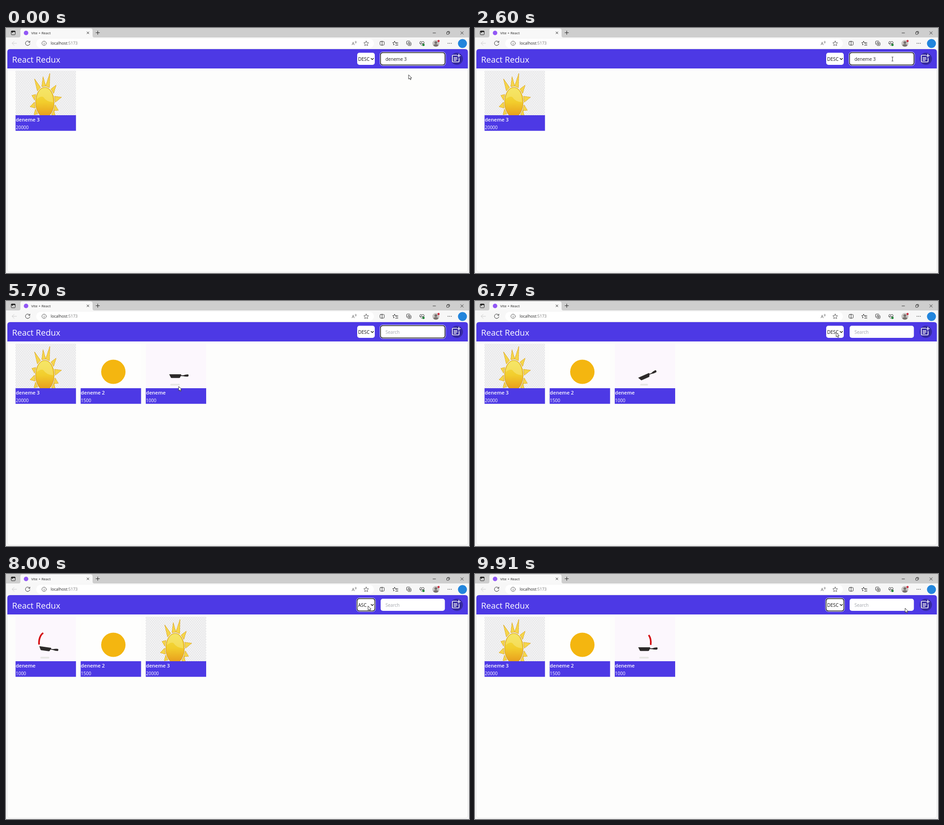
Animation, 1027 px wide and 545 px high, one loop 9.95 s. Source, as an HTML page:

```html
<!DOCTYPE html>
<html lang="en">
<head>
<meta charset="utf-8">
<title>Vite + React</title>
<style>
  html, body { margin: 0; width: 100%; height: 100%; overflow: hidden; background: #f7f7f7; }
  svg { display: block; width: 1027px; height: 545px; font-family: "Open Sans", "Noto Sans", sans-serif; }
  text { white-space: pre; }
  .line { fill: none; stroke: #333; stroke-width: 1; stroke-linecap: round; stroke-linejoin: round; }
  .name { font-size: 11.1px; font-weight: 600; fill: #fff; }
  .price { font-size: 10px; fill: #fff; }
  .ring rect { fill: none; }
</style>
</head>
<body>
<svg viewBox="0 0 1027 545">
  <defs>
    <pattern id="check" width="4" height="6" patternUnits="userSpaceOnUse">
      <rect width="4" height="6" fill="#fafafa"/>
      <path d="M0 0h2v3h-2zM2 3h2v3h-2z" fill="#e2e2e4"/>
    </pattern>
    <linearGradient id="sunFill" x2="0" y2="1">
      <stop offset="0" stop-color="#f3df45"/>
      <stop offset=".5" stop-color="#f2cd2c"/>
      <stop offset="1" stop-color="#e79a1c"/>
    </linearGradient>
    <clipPath id="photo"><rect y="95" width="134" height="99"/></clipPath>
  </defs>

  <!-- browser window -->
  <rect width="1027" height="545" fill="#f7f7f7"/>
  <rect width="1027" height="21" fill="#cecece"/>
  <path d="M28 21q4 0 4-4V5q0-4 4-4H187q5 0 5 4V17q0 4 4 4z" fill="#f8f8f8"/>
  <g class="line">
    <rect x="11.5" y="6.5" width="9" height="8.5" rx="1.5" stroke="#222"/>
    <path d="M12 8h8M14 8v2" stroke="#222" stroke-width="2"/>
    <path d="M179.5 8.5l4.500 4.500m0-4.500l-4.500 4.500M199.500 10.500h8m-4-4v8" stroke="#222"/>
    <path d="M947 11h6M1008.500 8l6 6m0-6l-6 6"/>
    <rect x="977.500" y="9" width="5" height="5" rx="1"/>
    <path d="M979.500 7.500h3.500q1 0 1 1v3.500"/>
    <path d="M23.500 34h-10m4.500-4.500l-4.500 4.500 4.500 4.500" stroke="#ccc"/>
    <path d="M52.500 31.500a5 5 0 1 0 .5 3.500M53 29v3h-3"/>
  </g>
  <circle cx="44.500" cy="11" r="5" fill="#9157f5"/>
  <text x="56" y="13.500" font-size="7.950" fill="#222">Vite + React</text>
  <rect x="67" y="24" width="749" height="20.500" rx="10" fill="#fff"/>
  <g class="line">
    <circle cx="84.500" cy="34" r="4.800" stroke="#555"/>
    <path d="M84.500 33.500v3M84.500 31.500v.1" stroke="#555"/>
    <path d="M799 29l1.600 3.400 3.700.5-2.700 2.600.7 3.700-3.300-1.800-3.300 1.800.7-3.700-2.700-2.600 3.700-.5z" stroke="#555"/>
    <path d="M774.500 30q1.500 1.500 0 3M776 29q2.500 2.500 0 5" stroke="#555" stroke-width=".8"/>
    <rect x="829.500" y="30" width="9.500" height="8" rx="1.500"/><path d="M834.200 29v10"/>
    <path d="M862 29.500l1.300 2.800 3 .3-2.200 2M862 29.500l-1.300 2.800-3 .3 2.200 2.100-.6 3 2-1M864.500 32.500h5M865.500 35.500h4M864 38.500h5.500"/>
    <rect x="891.500" y="32" width="7" height="7" rx="1.500"/><path d="M889.500 36.500q-1 0-1-1.500v-4q0-2 2-2h4q1.500 0 1.500 1M895 33.500v4m-2-2h4"/>
    <path d="M922.500 39l-4-4q-2-3 .5-4.800 2-1 3.500 1 1.500-2 3.700-1 2.500 1.600.8 4.500M918 34.500h2.500l1.200-2 1.600 3.500 1-1.500h2"/>
  </g>
  <circle cx="926" cy="37.500" r="2.600" fill="#24883b"/>
  <text x="767" y="38" font-size="9.500" fill="#555">A</text>
  <text x="99" y="37.300" font-size="8.900" fill="#222">localhost<tspan fill="#777">:5173</tspan></text>
  <circle cx="953.500" cy="34.500" r="7.800" fill="#c9c6c4"/>
  <circle cx="953.500" cy="32.500" r="3" fill="#77716e"/>
  <path d="M948 39q0-3 5.500-3t5.500 3q-5.500 4.500-11 0z" fill="#77716e"/>
  <circle cx="959.500" cy="29" r="2.400" fill="#c92a3c"/>
  <path d="M980.500 34h.1m3.500 0h.1m3.500 0h.1" class="line" style="stroke-width:1.700"/>
  <circle cx="1012.500" cy="34.500" r="10" fill="#2285dc"/>

  <!-- page -->
  <rect x="3" y="47" width="1021.500" height="496" rx="6" fill="#fdfdfc" stroke="#dedede" stroke-width=".7"/>
  <path d="M3 90V53q0-6 6-6H1018.500q6 0 6 6V90z" fill="#4d39e5"/>
  <text x="13.500" y="76.500" font-size="18.600" fill="#fff">React Redux</text>

  <rect x="779" y="55" width="39" height="27" rx="5" fill="#fff"/>
  <g class="ring" id="selectRing">
    <rect x="777.500" y="53.500" width="42" height="30" rx="6" stroke="#fff"/>
    <rect x="778.700" y="54.700" width="39.600" height="27.600" rx="5" stroke="#111" stroke-width="1.500"/>
  </g>
  <text id="order" x="781" y="73.200" font-size="10.400" fill="#111"></text>
  <path d="M809.800 67.500l2.700 2.700 2.700-2.700" class="line" style="stroke:#111;stroke-width:1.400"/>

  <rect x="831" y="55" width="142.500" height="27" rx="5" fill="#fff"/>
  <g class="ring" id="inputRing">
    <rect x="829.500" y="53.500" width="145.500" height="30" rx="6" stroke="#fff"/>
    <rect x="830.700" y="54.700" width="143" height="27.600" rx="5" stroke="#111" stroke-width="1.500"/>
  </g>
  <text id="field" x="841.700" y="73.200" font-size="10.050"></text>
  <rect id="caret" y="63" width="1" height="13" fill="#111"/>

  <circle cx="1000" cy="68.500" r="13.500" fill="#3529a0"/>
  <g fill="none" stroke="#fff" stroke-width="1.700">
    <path d="M1000 60.500h-8.500q-1.500 0-1.500 1.500v12q0 1.500 1.500 1.500h12q1.500 0 1.500-1.500v-7"/>
    <path d="M993 66h8M993 69h8.500M993 72h6" stroke-width="1.300"/>
    <path d="M1004.500 57.500v8m-4-4h8"/>
  </g>

  <!-- cards -->
  <g id="sun">
    <rect y="95" width="134" height="99" fill="url(#check)"/>
    <g clip-path="url(#photo)">
      <g id="rays" fill="#f5d64b" stroke="#dfa922" stroke-width=".9" stroke-linejoin="round"></g>
      <ellipse cx="65" cy="165" rx="20.500" ry="33" fill="url(#sunFill)" stroke="#d9a021" stroke-width="1.200"/>
      <path d="M47 158C49 140 56 134 65 134S82 141 83 165Q68 164 62 154 57 150 47 158z" fill="#f8ef9a" opacity=".4"/>
    </g>
  </g>
  <g id="plate">
    <rect y="95" width="134" height="99" fill="#fefefd"/>
    <circle cx="72.500" cy="157.500" r="27" fill="#f4b610"/>
  </g>
  <g id="pan">
    <rect y="95" width="134" height="99" fill="#fcf7fd"/>
    <rect id="shade" y="184.300" height="3.600" rx="1.500" fill="#e7e6e4"/>
    <path id="food" fill="none" stroke="#d40d12" stroke-width="3.600"/>
    <path id="skillet" fill="#2d2a2a" d="M52 163H78.500V165.200L83 165.300Q90 163 94 163.300 96 165.500 94 168 89 168.800 83 167.200L77.700 167 76 170.200Q75.500 171.300 74 171.300H57.500Q56 171.300 55.500 170z"/>
  </g>

  <g id="arrow">
    <path d="M0 0V9.700L2.300 7.700 3.900 11.200 5.500 10.500 4 7.200H7z" fill="#fff" stroke="#222" stroke-width=".9" stroke-linejoin="round"/>
  </g>
  <path id="beam" d="M-2-4.500h1.500l.5.500.5-.5H2M0-4V4M-2 4.500h1.500l.5-.5.5.5H2" fill="none" stroke="#222" stroke-width=".9"/>
</svg>

<script>
const LOOP = 9950, SPIN = 2400, SPIN_START = 4200;
const FIRST_CUT = 3340, SECOND_CUT = 3400, CLEAR = 4600, KEY_GAP = 80;
const BLUR = 6700, OPEN = 6860, ASC = 7500, DESC = 9000;
const SVG = "http://www.w3.org/2000/svg";
const el = id => document.getElementById(id);
const set = (node, attrs) => { for (const k in attrs) node.setAttribute(k, attrs[k]); };
const show = (id, on) => { el(id).style.display = on ? "" : "none"; };
const add = (parent, tag, attrs, text = "") => {
  const node = document.createElementNS(SVG, tag);
  set(node, attrs);
  node.textContent = text;
  parent.append(node);
};
const write = (node, text) => { if (node.textContent !== text) node.textContent = text; };
const smooth = u => u * u * (3 - 2 * u);
const linear = u => u;

// Keys are [time, value, value...]; returns the blended values.
function blend(keys, t, ease) {
  let i = keys.findIndex(k => k[0] > t);
  if (i < 0) return keys[keys.length - 1].slice(1);
  if (i === 0) return keys[0].slice(1);
  const a = keys[i - 1], b = keys[i], u = ease((t - a[0]) / (b[0] - a[0]));
  return a.slice(1).map((v, n) => v + (b[n + 1] - v) * u);
}

const pointer = [
  [0, 893, 104], [330, 893, 104], [460, 895, 103], [1230, 895, 103], [1770, 926, 69],
  [3630, 926, 69], [3850, 540, 146], [4200, 540, 146], [4330, 531, 144],
  [5300, 390, 186], [5700, 383, 190], [5950, 383, 190], [6700, 801, 70],
  [6950, 801, 70], [7350, 797, 95], [7550, 797, 95], [7900, 803, 71],
  [8300, 803, 71], [8800, 798, 107], [9100, 798, 107], [9800, 954, 76]
];
const tilt = [
  [0, 0], [130, -19], [170, -24], [270, -30], [400, -26], [600, 0], [720, 6],
  [910, 0], [1300, 0], [1400, 8], [1490, 0]
];
const arc = [[700, -14, -10], [780, -14, 10], [910, -12, 48], [1160, 45, 122], [1400, 108, 190], [1480, 186, 190]];

function buildCards() {
  const tips = [[76, 101], [61, 108], [42, 113], [90, 127], [102, 154], [95, 183], [36, 150], [32, 175], [41, 193], [88, 196]];
  for (const [x, y] of tips) {
    const a = Math.atan2((y - 165) / 33, (x - 65) / 20.5);
    const edge = d => `${65 + 23 * Math.cos(a + d)} ${165 + 36 * Math.sin(a + d)}`;
    add(el("rays"), "path", { d: `M${edge(-.19)}L${x} ${y}L${edge(.19)}z` });
  }
  for (const [id, name, price] of [["sun", "deneme 3", 20000], ["plate", "deneme 2", 1500], ["pan", "deneme", 1000]]) {
    const card = el(id);
    add(card, "rect", { y: 194, width: 134, height: 34.7, fill: "#4d39e5" });
    add(card, "text", { class: "name", x: .5, y: 207.700 }, name);
    add(card, "text", { class: "price", x: .5, y: 225 }, price);
  }
}

function fieldText(t) {
  if (t < FIRST_CUT) return "deneme 3";
  if (t < SECOND_CUT) return "deneme ";
  const gone = t < CLEAR ? 0 : 1 + Math.floor((t - CLEAR) / KEY_GAP);
  return "deneme".slice(0, Math.max(0, 6 - gone));
}

function caretOn(t) {
  if (t < 1000 || t >= BLUR) return false;
  const lastClear = CLEAR + KEY_GAP * Math.min(5, Math.floor((t - CLEAR) / KEY_GAP));
  const since = t >= CLEAR ? lastClear : t >= FIRST_CUT ? FIRST_CUT : 1000;
  return Math.floor((t - since) / 533) % 2 === 0;
}

function drawHeader(t) {
  const text = fieldText(t), field = el("field");
  write(field, text || "Search");
  field.setAttribute("fill", text ? "#222" : "#a3a6ad");
  write(el("order"), t >= ASC && t < DESC ? "ASC" : "DESC");
  show("inputRing", t < BLUR);
  show("selectRing", t >= OPEN);
  show("caret", caretOn(t));
  el("caret").setAttribute("x", 841.5 + (text ? field.getComputedTextLength() : 0));
}

function drawCards(t) {
  const ids = ["sun", "plate", "pan"];
  const order = t >= ASC && t < DESC ? ids.slice().reverse() : ids;
  order.forEach((id, i) => el(id).setAttribute("transform", `translate(${21.2 + i * 144.4} 0)`));
  show("plate", t >= FIRST_CUT);
  show("pan", t >= SECOND_CUT);
}

function drawPan(t) {
  const p = t < SPIN_START ? 0 : (t - SPIN_START) % SPIN;
  const [angle] = blend(tilt, p, linear);
  const width = 21 - Math.abs(angle) * .16;
  set(el("skillet"), { transform: `rotate(${angle} 70 167)` });
  set(el("shade"), { x: 65 - width / 2, width });
  const flying = p > 700 && p < 1480;
  show("food", flying);
  if (!flying) return;
  const [tail, head] = blend(arc, p, linear);
  const at = deg => {
    const a = deg * Math.PI / 180;
    return `${66 + 14 * Math.cos(a)} ${153 - 23 * Math.sin(a)}`;
  };
  set(el("food"), { d: `M${at(tail)}A14 23 0 0 0 ${at(head)}` });
}

function drawPointer(t) {
  const [x, y] = blend(pointer, t, smooth);
  const typing = t < 4000 && x > 831 && x < 973 && y > 55 && y < 82;
  show("arrow", !typing);
  show("beam", typing);
  set(el(typing ? "beam" : "arrow"), { transform: `translate(${x} ${y})` });
}

function frame() {
  const t = performance.now() % LOOP;
  drawHeader(t);
  drawCards(t);
  drawPan(t);
  drawPointer(t);
  requestAnimationFrame(frame);
}

buildCards();
frame();
</script>
</body>
</html>
```
